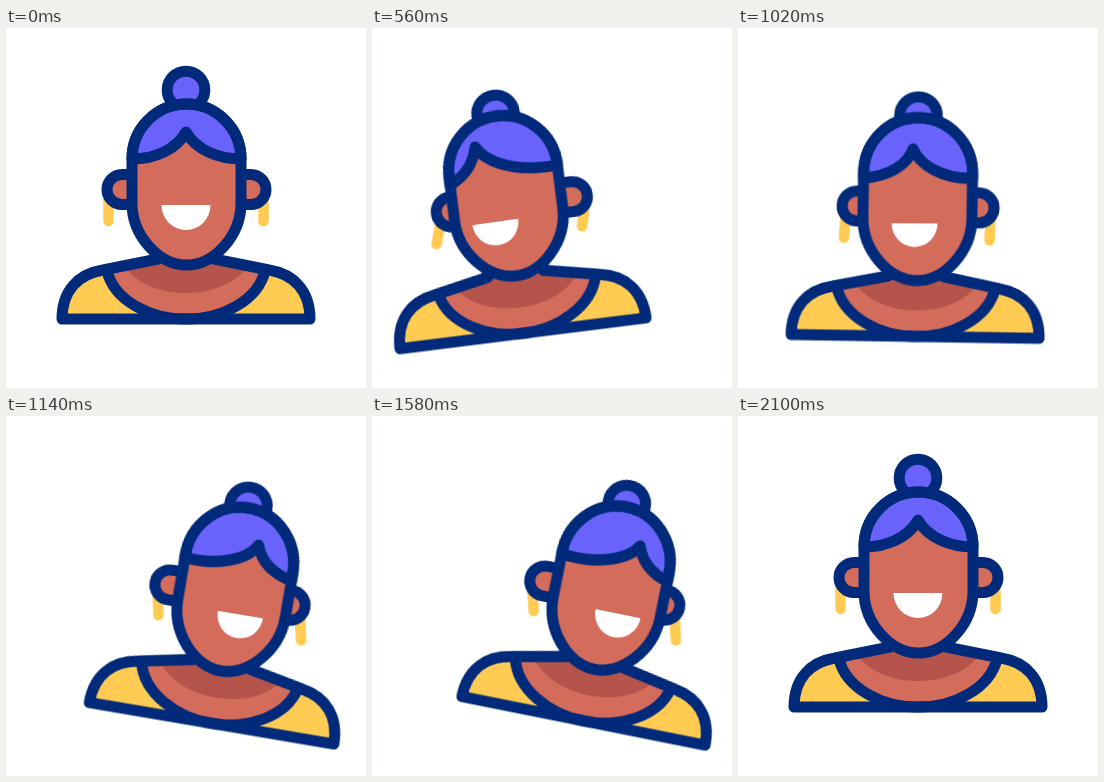
An HTML page without scripts that plays this animation: 360x360 px, repeating every 2400 ms.

```html
<!DOCTYPE html>
<html lang="en">
<head>
<meta charset="utf-8">
<title>Swaying woman</title>
<style>
  html, body { margin: 0; width: 100%; height: 100%; overflow: hidden; background: #fff; }
  svg { display: block; width: 100vw; height: 100vh; }

  .line { stroke: #022a7a; stroke-width: 11; stroke-linejoin: round; stroke-linecap: round; }
  .skin { fill: #d46c5c; }
  .shade { fill: #b4544a; }
  .hair { fill: #6a63fb; }
  .top { fill: #ffcb52; }
  .none { fill: none; }
  .ring { stroke: #ffcb52; stroke-width: 10.5; stroke-linecap: round; }

  /* every part goes rest, left pose (--l), right pose (--r), rest */
  .move, .fringe, .dip {
    animation: sway 2.4s cubic-bezier(.76, 0, .24, 1) infinite;
  }
  @keyframes sway {
    0%, 85.83%, 100% { transform: none; }
    28.33% { transform: var(--l); }
    57.92% { transform: var(--r); }
  }

  /* bends the travel into a shallow arc */
  .dip { animation-name: dip; }
  @keyframes dip {
    0%, 28.33%, 57.92% { transform: translateY(0); animation-timing-function: cubic-bezier(.76, 0, .88, 1); }
    14.17%, 71.87% { transform: translateY(-1.2px); animation-timing-function: cubic-bezier(.12, 0, .24, 1); }
    43.12% { transform: translateY(2.5px); animation-timing-function: cubic-bezier(.12, 0, .24, 1); }
    85.83%, 100% { transform: translateY(0); }
  }

  .figure {
    transform-origin: 179.5px 291px;
    --l: translate(-29.6px, 14.8px) rotate(-7.3deg);
    --r: translate(34px, 15.2px) rotate(12.2deg);
  }
  .bun { --l: translate(0, 8px); --r: translate(0, 8.5px); }
  .ear.left { --l: translate(8px, 0); --r: translate(-1.5px, 0); }
  .ear.right { --l: translate(1px, 0); --r: translate(-8.5px, 0); }
  .head {
    transform-origin: 180px 71px;
    --l: translate(0, -4px) scaleY(1);
    --r: translate(0, -3.5px) scaleY(1.03);
  }
  .mouth {
    transform-origin: 180px 177px;
    --l: translate(-14px, 4px) rotate(-1deg) scale(.94);
    --r: translate(14px, 2.5px) rotate(0deg) scale(.93);
  }
  .ring.left {
    transform-origin: 102.5px 165px;
    --l: translate(3.5px, 0) rotate(18deg);
    --r: translate(1.5px, 1px) rotate(-16deg);
  }
  .ring.right {
    transform-origin: 257.5px 165px;
    --l: translate(.5px, 0) rotate(15deg);
    --r: translate(-2px, 2px) rotate(-16deg);
  }

  .fringe { animation-name: part; }
  @keyframes part {
    0%, 85.83%, 100% { d: path("M126 131A54.5 55 0 0 1 235 131L235 131C213 131 190 122 180 104C170 122 148 131 126 131Z"); }
    28.33% { d: path("M126 131A54.5 55 0 0 1 235 131L235 132C192 136 163 120 155 104C151 121 142 132 126 139Z"); }
    57.92% { d: path("M126 131A54.5 55 0 0 1 235 131L235 140C219 135 208 126 203 111C195 125 165 138 126 133Z"); }
  }
</style>
</head>
<body>
<svg viewBox="0 0 360 360">
  <defs>
    <clipPath id="neck">
      <path id="collar" d="M101 243C108 272 143 291 180 291S252 272 259 243L208 231V212H152V231Z"/>
    </clipPath>
  </defs>
  <g class="dip">
    <g class="move figure">
      <circle class="move bun hair line" cx="180" cy="62" r="18.8"/>

      <g class="move ear left">
        <path class="move ring left" d="M102.5 165V193"/>
        <path class="skin line" d="M134 146.5H116a15 15 0 0 0 0 30H134"/>
      </g>
      <g class="move ear right">
        <path class="move ring right" d="M257.5 165V193"/>
        <path class="skin line" d="M226 146.5H245a15 15 0 0 1 0 30H226"/>
      </g>

      <path class="top" d="M56 291C56 263 72 246 97 242L152 231H208L263 242C288 246 304 263 304 291Z"/>
      <use href="#collar" class="skin"/>
      <ellipse class="shade" cx="180" cy="222" rx="66" ry="43" clip-path="url(#neck)"/>
      <path class="none line" d="M101 243C108 272 143 291 180 291S252 272 259 243"/>
      <path class="none line" d="M152 222V231L97 242C72 246 56 263 56 291H304C304 263 288 246 263 242L208 231V222"/>

      <g class="move head">
        <path class="skin" d="M126 131A54.5 55 0 0 1 235 131V175C235 208 208 237 180.5 237S126 208 126 175Z"/>
        <path class="fringe hair line" d="M126 131A54.5 55 0 0 1 235 131L235 131C213 131 190 122 180 104C170 122 148 131 126 131Z"/>
        <path class="none line" d="M126 131A54.5 55 0 0 1 235 131V175C235 208 208 237 180.5 237S126 208 126 175Z"/>
        <path class="move mouth" fill="#fff" d="M155.5 177H204.5A24.5 25 0 0 1 155.5 177Z"/>
      </g>
    </g>
  </g>
</svg>
</body>
</html>
```
